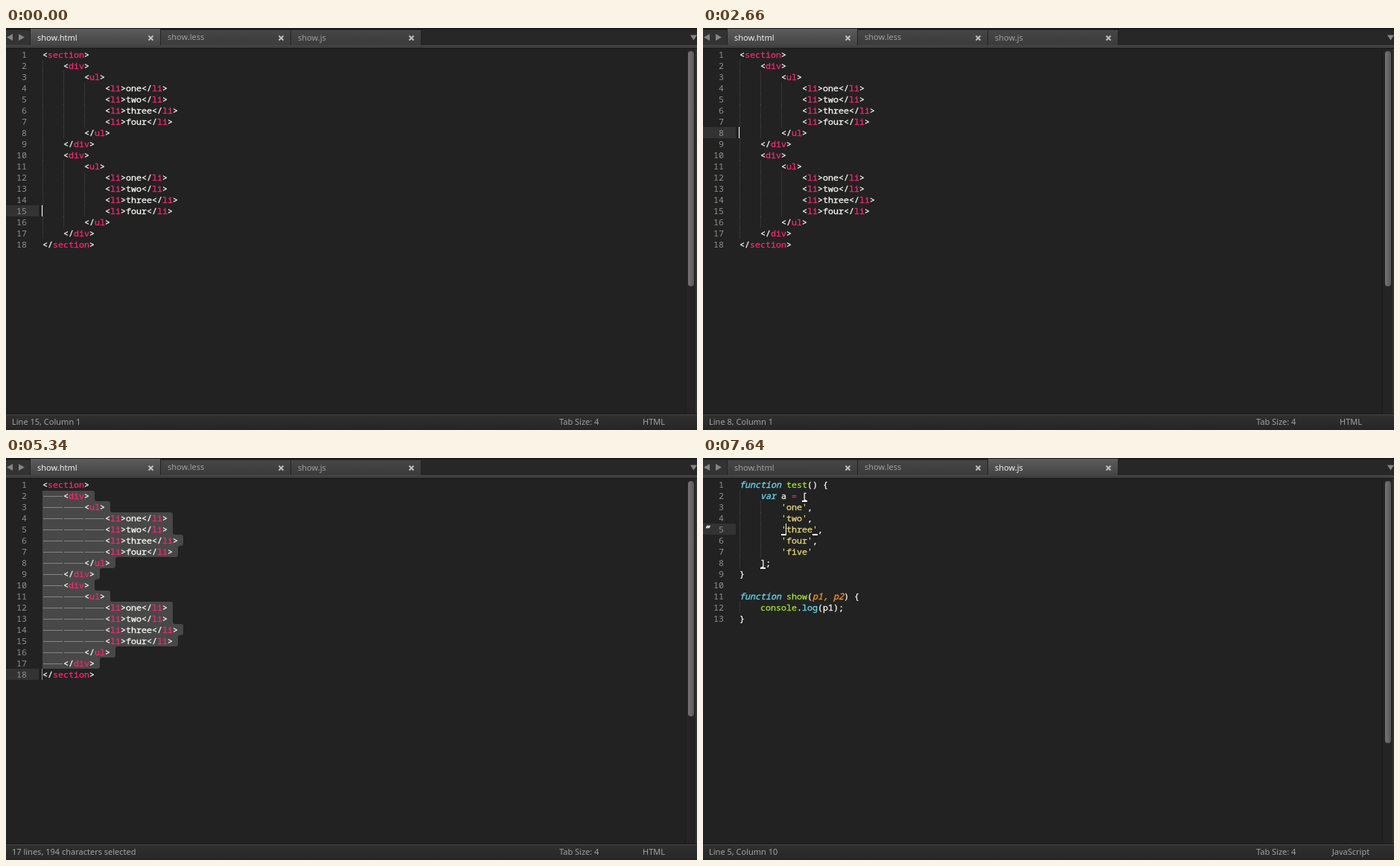
Recreate the animation shown at these times as an HTML page. Size 928 by 540 pixels, loop 8 s.

```html
<!DOCTYPE html>
<html lang="en">
<head>
<meta charset="utf-8">
<title>Code editor</title>
<style>
  html, body { margin: 0; width: 100%; height: 100%; overflow: hidden; background: #222; }
  svg { display: block; width: 928px; height: 540px; }
  text { white-space: pre; }
  .code { font: 11.667px "Noto Sans Mono", "DejaVu Sans Mono", monospace; }
  .code text { fill: currentColor; stroke: currentColor; stroke-width: .3; }
  .code .num { color: #8f908a; stroke: none; text-anchor: end; }
  .code .mark { font: bold 13px "Noto Sans", sans-serif; color: #fff; }
  .ui { font: 11px "Noto Sans", "Open Sans", sans-serif; fill: #a3a3a3; }
  rect, line { shape-rendering: crispEdges; }
  .smooth { shape-rendering: auto; }
  .w { color: #f8f8f2; }
  .t { color: #f92672; }
  .k { color: #66d9ef; font-style: italic; }
  .b { color: #66d9ef; }
  .f { color: #a6e22e; }
  .s { color: #e6db74; }
  .p { color: #fd971f; font-style: italic; }
</style>
</head>
<body>
<svg viewBox="0 0 928 540">
  <defs>
    <linearGradient id="idle" x2="0" y2="1"><stop stop-color="#464646"/><stop offset="1" stop-color="#3b3b3b"/></linearGradient>
    <linearGradient id="active" x2="0" y2="1"><stop stop-color="#5c5c5c"/><stop offset="1" stop-color="#434343"/></linearGradient>
    <linearGradient id="strip" x2="0" y2="1"><stop stop-color="#494949"/><stop offset="1" stop-color="#353535"/></linearGradient>
    <linearGradient id="foot" x2="0" y2="1"><stop stop-color="#303030"/><stop offset="1" stop-color="#262626"/></linearGradient>
    <linearGradient id="thumbFill"><stop stop-color="#757575"/><stop offset="1" stop-color="#585858"/></linearGradient>
  </defs>
  <rect width="928" height="540" fill="#222"/>
  <rect width="928" height="24" fill="#272727"/>
  <rect width="928" height="2" fill="#1b1b1b"/>
  <rect y="3" width="32" height="20" fill="#333"/>
  <path d="M9 8v9L1 12.500zM17 8v9l8-4.500zM919 9.500h9l-4.500 7z" fill="#858585"/>
  <rect y="23" width="928" height="4" fill="url(#strip)"/>
  <g id="tabs"></g>
  <rect y="27" width="928" height="1" fill="#171717"/>
  <rect x="912" y="28" width="1" height="491" fill="#1c1c1c"/>
  <rect x="913" y="28" width="13" height="491" fill="#242424"/>
  <rect x="926" y="28" width="2" height="491" fill="#333"/>
  <rect id="thumb" class="smooth" x="916" y="31" width="8" rx="4" fill="url(#thumbFill)"/>
  <g id="editor" class="code"></g>
  <rect y="518" width="928" height="1" fill="#191919"/>
  <rect y="519" width="928" height="21" fill="url(#foot)"/>
  <rect y="519" width="928" height="1" fill="#474747"/>
  <text id="status" class="ui" x="8" y="533"></text>
  <text class="ui" x="743" y="533">Tab Size: 4</text>
  <text id="syntax" class="ui" x="870" y="533" text-anchor="middle"></text>
</svg>
<script>
const LOOP = 8000, LEFT = 49, TOP = 28, ROW = 15, CHAR = 7, TAB = 4 * CHAR;
const $ = id => document.getElementById(id);
const esc = s => s.replace(/&/g, '&amp;').replace(/</g, '&lt;');
const rowY = line => TOP + (line - 1) * ROW;

const items = ['one', 'two', 'three', 'four'].map(s => `\t\t\t<li>${s}</li>`);
const block = ['\t<div>', '\t\t<ul>', ...items, '\t\t</ul>', '\t</div>'];
const htmlLines = ['<section>', ...block, ...block, '</section>'];

// Tokens are split by "|"; a leading "x~" picks the colour class.
const jsLines = [
  'k~function| |f~test|() {',
  '\tk~var| a |t~=| [',
  ...['one', 'two', 'three', 'four'].map(s => `\t\ts~'${s}'|,`),
  "\t\ts~'five'",
  '\t];',
  '}',
  '',
  'k~function| |f~show|(|p~p1, p2|) {',
  '\tf~console|.|b~log|(p1);',
  '}'
];

function parseHtml(body) {
  return body.match(/<\/?|>|[^<>]+/g).map((text, i, all) =>
    [i && /^</.test(all[i - 1]) ? 't' : 'w', text]);
}
function parseJs(body) {
  return body.split('|').map(s => s[1] === '~' ? [s[0], s.slice(2)] : ['w', s]);
}
function makeDoc(lines, parse, extra) {
  const rows = lines.map(raw => {
    const depth = raw.match(/^\t*/)[0].length;
    const tokens = parse(raw.slice(depth));
    const length = tokens.reduce((n, [, text]) => n + text.length, 0);
    return { depth, tokens, length, end: LEFT + depth * TAB + length * CHAR };
  });
  return { rows, ...extra };
}
const docs = {
  html: makeDoc(htmlLines, parseHtml, { tab: 0, syntax: 'HTML', thumb: 316, column: 1 }),
  js: makeDoc(jsLines, parseJs, { tab: 2, syntax: 'JavaScript', thumb: 352, column: 10 })
};

// [start ms, document, caret line, caret opacity, first and last selected line]
const steps = [
  [0, 'html', 15, 1],
  [120, 'html', 14, 1], [520, 'html', 14, .5],
  [670, 'html', 13, 1], [1070, 'html', 13, .5], [1190, 'html', 13, 0],
  [1430, 'html', 16, 1, 12, 15], [1820, 'html', 16, .5, 12, 15], [1960, 'html', 16, 0, 12, 15],
  [2210, 'html', 11, 1], [2360, 'html', 10, 1], [2510, 'html', 9, 1],
  [2660, 'html', 8, 1], [2810, 'html', 7, 1],
  [2960, 'html', 6, 1], [3420, 'html', 6, .5],
  [3540, 'html', 8, 1, 4, 7],
  [3820, 'html', 3, 1], [4100, 'html', 2, 1],
  [4530, 'html', 2, .7], [4650, 'html', 2, .3], [4800, 'html', 2, 0],
  [4950, 'html', 18, 1, 2, 17], [5340, 'html', 18, .5, 2, 17], [5460, 'html', 18, 0, 2, 17],
  [6020, 'html', 18, .5, 2, 17], [6150, 'html', 18, 1, 2, 17], [6290, 'html', 18, .8, 2, 17],
  [6410, 'html', 18, .4, 2, 17], [6540, 'html', 18, 0, 2, 17],
  [6840, 'js', 3, 1], [7240, 'js', 3, .5], [7370, 'js', 3, 0],
  [7490, 'js', 4, 1], [7640, 'js', 5, 1]
];

function drawTabs(active) {
  $('tabs').innerHTML = ['show.html', 'show.less', 'show.js'].map((name, i) => {
    const x = 33 + i * 175, on = i === active, top = on ? 1 : 3;
    return `<rect x="${x - 1}" y="2" width="1" height="21" fill="#222"/>
      <rect x="${x}" y="${top}" width="174" height="${(on ? 24 : 23) - top}" fill="url(#${on ? 'active' : 'idle'})"/>
      <rect x="${x + 174}" y="2" width="1" height="21" fill="#222"/>
      <text class="ui" x="${x + 9}" y="${i === 1 ? 16 : 17}" style="fill:${on ? '#f0f0f0' : '#a0a0a0'}">${name}</text>
      <path d="M${x + 158.5} 10.500l6 6m0-6l-6 6" stroke="#c4c4c4" stroke-width="1.800"/>`;
  }).join('');
}

function selectionPath(rows, first, last) {
  const r = 3;
  let d = `M${LEFT} ${rowY(first) + 1}`;
  for (let n = first; n <= last; n++) {
    const x = rows[n - 1].end + CHAR, y = rowY(n) + (n === first), bottom = rowY(n + 1);
    const before = n === first ? LEFT : rows[n - 2].end + CHAR;
    const after = n === last ? LEFT : rows[n].end + CHAR;
    const dirIn = Math.sign(x - before), dirOut = Math.sign(after - x);
    if (dirIn) d += `L${x - dirIn * r} ${y}Q${x} ${y} ${x} ${y + r}`;
    if (dirOut) d += `L${x} ${bottom - r}Q${x} ${bottom} ${x + dirOut * r} ${bottom}`;
  }
  return `<path d="${d}L${LEFT} ${rowY(last + 1)}z" fill="#484848"/>`;
}

function drawRow(row, line, selected) {
  const y = rowY(line);
  let out = `<text class="num" x="28" y="${y + 12}">${line}</text>`;
  for (let k = 0; k < row.depth; k++) {
    const x = LEFT + k * TAB;
    out += selected
      ? `<rect x="${x + 1}" y="${y + 8}" width="${TAB - 2}" height="1" fill="#858585"/>`
      : `<line x1="${x + .5}" x2="${x + .5}" y1="${y}" y2="${y + ROW}" stroke="#484848" stroke-dasharray="1 1"/>`;
  }
  let x = LEFT + row.depth * TAB;
  for (const [kind, text] of row.tokens) {
    out += `<text class="${kind}" x="${x}" y="${y + 12}">${esc(text)}</text>`;
    x += text.length * CHAR;
  }
  return out;
}

const underline = (x, line) =>
  `<rect x="${x}" y="${rowY(line) + 14}" width="${CHAR}" height="2" fill="#f8f8f2"/>`;

function drawQuoteMarks(row, line) {
  const open = LEFT + row.depth * TAB, close = open + (row.tokens[0][1].length - 1) * CHAR;
  return underline(LEFT + 12 * CHAR, 2) + underline(LEFT + TAB, 8) +
    underline(open, line) + underline(close, line) +
    `<text class="mark" x="4" y="${rowY(line) + 12}">‘’</text>`;
}

function statusText(doc, line, first, last) {
  if (!first) return `Line ${line}, Column ${doc.column}`;
  const chars = doc.rows.slice(first - 1, last).reduce((n, r) => n + r.depth + r.length + 1, 0);
  return `${last - first + 2} lines, ${chars} characters selected`;
}

function draw([, name, line, opacity, first, last]) {
  const doc = docs[name];
  drawTabs(doc.tab);
  $('thumb').setAttribute('height', doc.thumb);
  $('syntax').textContent = doc.syntax;
  $('status').textContent = statusText(doc, line, first, last);
  $('editor').innerHTML =
    `<rect y="${rowY(line)}" width="44" height="${ROW}" fill="#333"/>` +
    (first ? selectionPath(doc.rows, first, last) : '') +
    doc.rows.map((row, i) => drawRow(row, i + 1, i + 1 >= first && i < last)).join('') +
    (name === 'js' ? drawQuoteMarks(doc.rows[line - 1], line) : '') +
    `<rect x="${LEFT - 1 + (doc.column - 1) * CHAR}" y="${rowY(line)}" width="1" height="${ROW}" fill="#fff" opacity="${opacity}"/>`;
}

let shown;
function tick(now) {
  const t = now % LOOP;
  const step = steps.findLast(s => s[0] <= t);
  if (step !== shown) draw(shown = step);
  requestAnimationFrame(tick);
}
tick(0);
</script>
</body>
</html>
```
